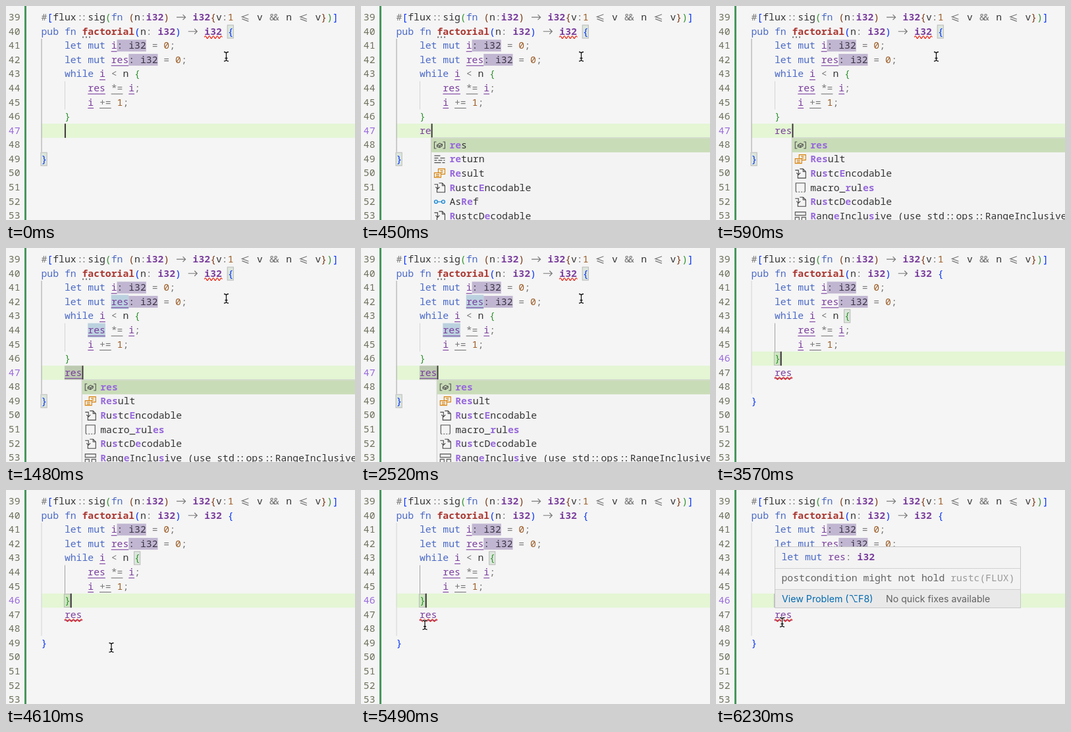
These frames come from a looping animation (530x326 px, 8000 ms). An HTML page:

```html
<!DOCTYPE html>
<html lang="en">
<head>
<meta charset="utf-8">
<title>Code editor</title>
<style>
html, body { margin: 0; width: 100%; height: 100%; overflow: hidden; background: #f5f5f5; }
svg { display: block; width: 530px; height: 326px; }
text { font: 14.75px "Noto Sans Mono", "DejaVu Sans Mono", monospace; white-space: pre; }
text.ui { font: 14.2px Inter, "Open Sans", sans-serif; }
text.b { font-weight: 700; }
</style>
</head>
<body>
<svg id="stage" viewBox="0 0 530 326"></svg>
<script>
const LOOP = 8000, W = 8.85, X0 = 53.5, ROW = 21.57;
const stage = document.getElementById('stage');
const colX = c => X0 + c * W;
const rowY = n => 6.7 + ROW * (n - 39);

// style letter: [colour, bold, underlined]
const STYLES = {
  k: ['#4b69c6'], t: ['#333'], p: ['#777'], o: ['#777', 0, 1],
  f: ['#aa3731', 1], y: ['#7a3e9d', 1], v: ['#7a3e9d'], u: ['#7a3e9d', 0, 1],
  c: ['#9c5d27'], h: ['#3c3546'], m: ['#9769dc', 1], d: ['#616161'], l: ['#9a9a9a'],
  1: ['#0431fa'], 2: ['#319331'], 3: ['#7b3814'],
  n: ['#6d705b'], a: ['#9769dc']
};

const esc = s => s.replace(/&/g, '&amp;').replace(/</g, '&lt;');
const rect = (x, y, w, h, fill, extra = '') =>
  `<rect x="${x}" y="${y}" width="${w}" height="${h}" fill="${fill}" ${extra}/>`;
const path = (x, y, d, stroke, width = 1.2, fill = 'none') =>
  `<path transform="translate(${x} ${y})" d="${d}" fill="${fill}" stroke="${stroke}" stroke-width="${width}"/>`;
const text = (x, y, s, fill, cls = '') =>
  `<text x="${x}" y="${y}" fill="${fill}" class="${cls}">${esc(s)}</text>`;

// Text pieces, with two-character operators drawn as ligatures
function piece(x, y, s, [color, bold]) {
  const cls = bold ? 'b' : '';
  let out = '';
  for (const part of s.split(/(->|<=|&&|::)/)) {
    if (part === '->') out += path(x, y, 'M2-5H15.5M11.5-9L15.5-5 11.5-1', color);
    else if (part === '<=') out += path(x, y, 'M14-9.5L4-5.8 14-2M4-2.6L14 1.2', color);
    else if (part === '&&' || part === '::')
      out += text(x + 1.4, y, part[0], color, cls) + text(x + W - 1.4, y, part[1], color, cls);
    else if (part.trim()) out += text(x, y, part, color, cls);
    x += part.length * W;
  }
  return out;
}

function run(x, y, ...parts) {
  let out = '';
  for (let i = 0; i < parts.length; i += 2) {
    const style = STYLES[parts[i]], s = parts[i + 1], w = s.length * W;
    if (parts[i] === 'h') out += rect(x, y - 14, w, 18, '#c1b6d1');
    out += piece(x, y, s, style);
    if (style[2]) out += rect(x, y + 3.4, w, 1.1, style[0]);
    x += w;
  }
  return out;
}

const line = (n, col, ...parts) => run(colX(col), rowY(n) + 15.5, ...parts);
const squiggle = (n, col) =>
  path(colX(col), rowY(n) + 19.3, 'M0 0q1.5-3.6 3 0' + 't3 0'.repeat(8), '#e51400', 1.2);
const bracket = (n, col) =>
  rect(colX(col) - .5, rowY(n) + .8, W + .3, 20, 'rgba(0,100,0,.1)', 'stroke="#b9b9b9"');
const word = (n, col, fill) => rect(colX(col), rowY(n), 3 * W, ROW, fill);

const CODE =
  line(39, 0, 'p', '#', 1, '[', 't', 'flux', 'p', '::', 't', 'sig', 2, '(', 'k', 'fn ', 3, '(', 't', 'n', 'p', ':',
    'y', 'i32', 3, ')', 'p', ' -> ', 'y', 'i32', 3, '{', 't', 'v', 'p', ':', 'c', '1', 'p', ' <= ', 't', 'v',
    'p', ' && ', 't', 'n', 'p', ' <= ', 't', 'v', 3, '}', 2, ')', 1, ']') +
  line(40, 0, 'k', 'pub fn ', 'f', 'factorial', 1, '(', 't', 'n', 'p', ': ', 'y', 'i32', 1, ')', 'p', ' -> ',
    'y', 'i32', 1, ' {') +
  line(41, 4, 'k', 'let mut ', 'u', 'i', 'h', ': i32', 'p', ' = ', 'c', '0', 'p', ';') +
  line(42, 4, 'k', 'let mut ', 'u', 'res', 'h', ': i32', 'p', ' = ', 'c', '0', 'p', ';') +
  line(43, 4, 'k', 'while ', 'u', 'i', 'p', ' < ', 't', 'n', 2, ' {') +
  line(44, 8, 'u', 'res', 'p', ' ', 'o', '*=', 'p', ' ', 'u', 'i', 'p', ';') +
  line(45, 8, 'u', 'i', 'p', ' ', 'o', '+=', 'p', ' ', 'c', '1', 'p', ';') +
  line(46, 4, 2, '}') + line(49, 0, 1, '}');

const ICONS = {
  variable: ['#505050', 'M-5-5H-8V5H-5M5-5H8V5H5M-4 0L0-3 4-1.5V1L0 3.5-4 2ZM-4 0L0 1 4-1.5M0 1V3.5'],
  keyword: ['#505050', 'M-8-5.5H1M-8-2H-2M1-2H8M-8 1.5H-4M-2 1.5H4M6 1.5H8M-8 5H2M4 5H8'],
  enum: ['#d67e00', 'M-2-1V-7H8V1H2M1-4.5H5M2-2H5M-8-1H2V6H-8ZM-5.5 1.5H-.5M-5.5 4H-.5'],
  type: ['#424242', 'M-4 2V7H8V-3L4-7H-1M4-7V-3H8M-8-5H-3V1M-6-1L-3 2 0-1'],
  trait: ['#007acc', 'M-3 0H3M-8 0a2.4 2.4 0 1 0 5 0a2.4 2.4 0 1 0-5 0M3 0a2.4 2.4 0 1 0 5 0a2.4 2.4 0 1 0-5 0'],
  macro: ['#505050', 'M-7 6V-7H7V6M-7 6.5h2m2 0h2m2 0h2m2 0h2'],
  struct: ['#505050', 'M-8-6H8V-1H-8ZM-8 2H-2V7H-8ZM2 2H8V7H2Z']
};

// Matched letters stand between asterisks
const SHORT = [['variable', '*re*s'], ['keyword', '*re*turn'], ['enum', '*Re*sult'],
  ['type', '*R*ustc*E*ncodable'], ['trait', 'As*Re*f'], ['type', '*R*ustcD*e*codable']];
const FULL = [['variable', '*res*'], ['enum', '*Res*ult'], ['type', '*R*u*s*tc*E*ncodable'],
  ['macro', 'macro_*r*ul*es*'], ['type', '*R*u*s*tcD*e*codable'],
  ['struct', '*R*ang*e*Inclu*s*ive (use std::ops::RangeInclusive)']];

function suggestions(x, items) {
  const top = rowY(48);
  let out = rect(x, top, 540 - x, 140, '#f3f3f3', 'stroke="#c8c8c8"') +
    rect(x + .5, top + .5, 530 - x, ROW, '#c9dcb8');
  items.forEach(([icon, label], i) => {
    const y = top + ROW * i, [color, d] = ICONS[icon];
    const parts = label.split('*').flatMap((s, j) => [j % 2 ? 'm' : 't', s]);
    out += path(x + 13, y + 11.2, d, color, 1.1, icon === 'trait' ? '#cfe4f3' : 'none') +
      run(x + 28, y + 16, ...parts);
  });
  return out;
}

const HOVER =
  rect(89.5, 86.5, 373, 93, '#f3f3f3') +
  rect(90, 152, 372, 27, '#e9e9e9') +
  rect(90, 119, 372, 1, '#d2d2d2') + rect(90, 151, 372, 1, '#d2d2d2') +
  rect(89.5, 86.5, 373, 93, 'none', 'stroke="#c8c8c8"') +
  run(99.5, 107, 'k', 'let mut ', 'v', 'res', 'p', ': ', 'y', 'i32') +
  run(99.5, 139, 'd', 'postcondition might not hold ', 'l', 'rustc(FLUX)') +
  text(100, 171, 'View Problem (⌥F8)', '#006ab1', 'ui') +
  text(258, 171, 'No quick fixes available', '#616161', 'ui');

const BLINKS = [1030, 1480, 2070, 2520, 3120, 3570, 4010, 4600, 5040, 5490, 5940];
// Pointer stops: time, x, y
const STOPS = [[0, 334.5, 77], [2670, 372, 85], [2820, 440, 100], [2970, 513.5, 122], [3120, -20, 0],
  [4310, 234.5, 301], [4460, 205, 272], [4600, 160, 240], [4750, 120, 217], [4900, 101, 208],
  [5040, 97, 205.5], [5640, 99, 203.5], [5790, 100.5, 201.5]];

function pointer(t) {
  const [, x, y] = STOPS.filter(s => s[0] <= t).pop();
  const d = 'M-3.5-7Q0-7 0-4.5Q0-7 3.5-7M0-4.5V4.5M-3.5 7Q0 7 0 4.5Q0 7 3.5 7M-2 2.5H2';
  return path(x, y, d, '#fff', 3) + path(x, y, d, '#111', 1.3);
}

function draw(t) {
  const typed = [300, 450, 590].filter(s => t >= s).length;
  const moved = t >= 3570, active = moved ? 46 : 47;
  const marked = t >= 890 && !moved;
  const blue = 'rgba(14,99,156,.25)';
  let out = rect(0, 0, 530, 326, '#f5f5f5') + rect(28, 0, 3, 326, '#48985d') +
    rect(54, rowY(active), 476, ROW, '#e4f6d4');

  for (let n = 39; n < 54; n++) out += run(3.8, rowY(n) + 15.5, n === active ? 'a' : 'n', String(n));
  out += rect(53.5, rowY(41), 1, ROW * 8, moved ? '#d4d4d4' : '#a2a2a2') +
    rect(89, rowY(44), 1, ROW * 2, moved ? '#a2a2a2' : '#d4d4d4');

  out += moved ? bracket(43, 16) + bracket(46, 4) : bracket(40, 32) + bracket(49, 0);
  if (marked) out += word(42, 12, blue) + word(44, 8, blue) + word(47, 4, 'rgba(87,87,87,.28)');
  out += CODE + line(47, 4, t >= 890 ? 'u' : 'v', 'res'.slice(0, typed));

  if (t < 2820) {
    out += squiggle(40, 28);
    for (let i = 0; i < 3; i++) out += rect(116 + i * 5, 46.5, 2, 2, '#6c6c6c');
  }
  if (t >= 3420) out += squiggle(47, 4);

  if (BLINKS.filter(b => t >= b).length % 2 === 0)
    out += rect(colX(moved ? 5 : 4 + typed), rowY(active), 2, ROW, '#3c3638');
  if (t >= 450 && !moved) out += suggestions(colX(4 + typed) - .2, typed < 3 ? SHORT : FULL);
  if (t >= 6080) out += `<g opacity="${t < 6230 ? .6 : 1}">${HOVER}</g>`;
  return out + pointer(t);
}

const start = performance.now();
let last = '';
function frame() {
  const html = draw((performance.now() - start) % LOOP);
  if (html !== last) stage.innerHTML = last = html;
  requestAnimationFrame(frame);
}
frame();
</script>
</body>
</html>
```
